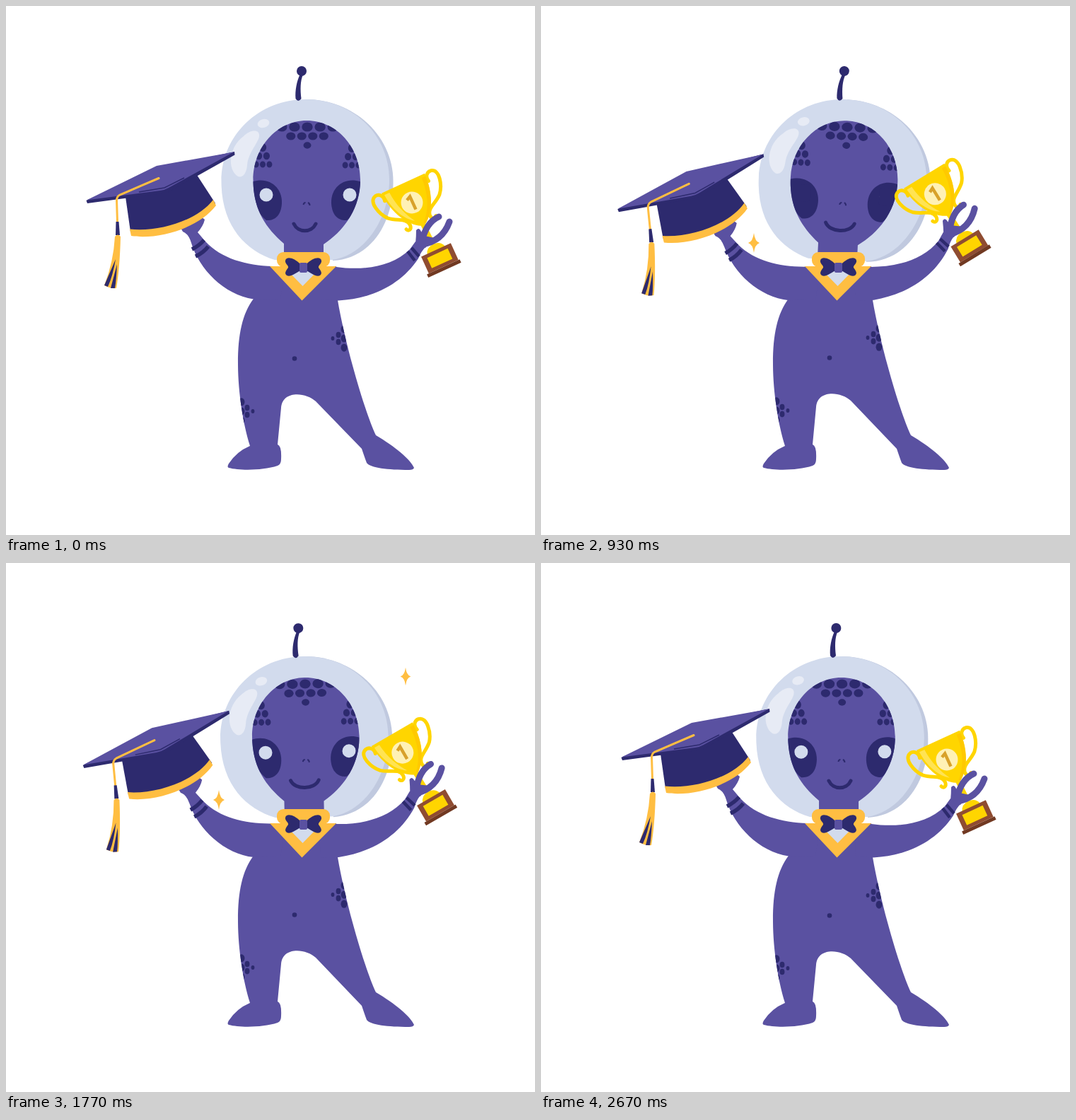
These frames come from a looping animation (748x748 px, 2700 ms). An HTML page:

```html
<!DOCTYPE html>
<html lang="en">
<head>
<meta charset="utf-8">
<title>Graduating alien</title>
<style>
  html, body { margin: 0; width: 100%; height: 100%; overflow: hidden; background: #fff; }
  svg { display: block; width: 100vw; height: 100vh; }
  .skin { fill: #5a51a1; }
  .navy { fill: #2d2a6e; }
  .gold { fill: #ffbe42; }
  .glass { fill: #d2dbed; }
  .shine { fill: #e7ebf5; }
  .cup { fill: #ffd500; }
  .line { fill: none; stroke: #2d2a6e; }
  .cord { fill: none; stroke: #ffbe42; stroke-width: 3; stroke-linecap: round; }
  .finger { fill: none; stroke: #5a51a1; stroke-width: 9; stroke-linecap: round; }
  .handle { fill: none; stroke: #ffd500; stroke-width: 5; stroke-linecap: round; }
</style>
</head>
<body>
<svg viewBox="0 0 748 748">
  <defs>
    <path id="faceShape" d="M425 162C468 162 501 200 501 246C501 286 478 318 449 337V352H393V336C365 312 349.500 285 349.500 246C349.500 200 383 162 425 162Z"/>
    <clipPath id="faceClip"><use href="#faceShape"/></clipPath>
    <clipPath id="bodyClip"><path id="bodyClipShape"/></clipPath>
    <path id="eye" class="navy" d="M347 249C371 240 391 256 390 279C389 298 378 304 368 303C355 293 347 275 347 249Z"/>
    <path id="wing" class="navy" d="M417 366C407 355 396 354 395 360C394 364 400 367 399 370C396 374 393 378 397 381C403 384 411 376 417 374Z"/>
    <path id="grip" class="handle" d="M34 -18C32 -25 37 -31 43 -30C56 -27 49 -4 40 6C29 16 16 16 15.500 28C16 35 22 35 23 31"/>
    <path id="star" class="gold" d="M0 -14Q1.500 -2 8 0Q1.500 2 0 14Q-1.500 2 -8 0Q-1.500 -2 0 -14Z"/>
  </defs>

  <path id="body" class="skin"/>
  <g id="bodyMarks">
    <circle class="navy" cx="408" cy="498.500" r="3.300"/>
    <g id="bodySpots" class="navy" clip-path="url(#bodyClip)"></g>
  </g>

  <g id="head">
    <path d="M424 132C492 132 547.500 184 547.500 248C547.500 312 512 358 462 360Z" fill="#c0c9df"/>
    <path class="glass" d="M424 132C490 132 542 182 542 246C542 300 508 352 462 359L380 359C338 346 304.500 310 304.500 248C304.500 182 358 132 424 132Z"/>
    <path class="shine" d="M336 184C345 175 357 174 358 182C359 192 343 205 341 225C340 238 334 243 328 241C313 232 314 200 336 184Z"/>
    <ellipse class="shine" cx="364" cy="166" rx="8.500" ry="6" transform="rotate(-15 364 166)"/>
    <circle class="navy" cx="418" cy="92" r="7"/>
    <path class="navy" d="M416 96C411 106 408.500 120 409.500 131Q413 137 417.500 131C416 118 416 106 420 97Z"/>
    <use href="#faceShape" class="skin"/>
    <g clip-path="url(#faceClip)">
      <g id="faceSpots" class="navy"></g>
      <use href="#eye"/>
      <use href="#eye" transform="matrix(-1 0 0 1 850 0)"/>
    </g>
    <g class="glass"><circle cx="368" cy="267" r="9.500"/><circle cx="486" cy="267" r="9.500"/></g>
    <path id="lids" class="navy"/>
    <path class="line" d="M420.500 281Q421 278 423.500 278M427 278Q429.500 279 429.500 282" stroke-width="2"/>
    <path id="mouth" class="line" stroke-width="5" stroke-linecap="round"/>
  </g>

  <g id="leftArm">
    <path class="skin" d="M395 372L377 368C340 367 304 357 282 333L271 320Q279 311 281 302L276 298L246 312L250 319Q258 322 262 335C273 372 308 408 350 414.500L388 415Z"/>
    <path class="line" stroke-width="5.500" d="M263 344Q273 339 280 331M268 354Q279 349 286 340"/>
    <path class="navy" d="M169 270L176 319C215 323 270 306 296 279L270 239Z"/>
    <path class="gold" d="M175 315.500C215 320 270 304 293 274L297 282C273 314 215 331 177 325Z"/>
    <path class="navy" d="M113.500 275L213 230L323 206L323.500 210.500L232 262Q226 265 220 265L115 279Z"/>
    <path class="skin" d="M114 274.500L213 226L322 206.500L230 257Q225 260 218 261Z"/>
    <path class="line" stroke-width="1.500" d="M188 263L224 257L252 243"/>
    <path class="cord" d="M216 243.500L161 267Q157 269 156.500 274"/>
    <g id="tassel">
      <path class="cord" stroke-width="2.500" d="M156.500 274L157.500 306"/>
      <path class="navy" d="M155.500 305H159.500L161 324H155Z"/>
      <path class="gold" d="M154 326Q158 321 162 326Q161 370 156 399Q147 400 139 395Q152 362 154 326Z"/>
      <path class="navy" d="M155 358Q151 382 144 397L139 395ZM157 365Q156 388 154 399L148 399Z"/>
    </g>
  </g>

  <g id="rightArm">
    <path class="skin" d="M445 372L467 369C503 374 545 370 571 344L579 333L593 341Q587 347 583 357C560 392 520 414 470 416.500L445 415Z"/>
    <path class="line" stroke-width="4.500" d="M568 347L578 360M573.500 342L584 354"/>
    <g transform="translate(574 278) rotate(-24.600)">
      <use href="#grip"/>
      <use href="#grip" transform="scale(-1 1)"/>
      <path class="cup" d="M-33.500 -30H33.500C33 2 20 25 5 35L6 66H-1L-2 35C-18 27 -33 2 -33.500 -30Z"/>
      <path d="M-31 -26H-23C-22 -6 -15 12 -7 25C-20 17 -30 -4 -31 -26Z" fill="#ffe353"/>
      <path d="M33 -26C32 2 20 25 5 35L3 33C17 20 26 0 27 -26Z" fill="#ffc900"/>
      <circle r="15.500" fill="#fff1b5"/>
      <path d="M-5 -6L1 -9V11" fill="none" stroke="#d8a12a" stroke-width="4.500"/>
      <path class="cup" d="M-11 76Q-8 66 3 66Q14 66 17 76Z"/>
      <path d="M-20 75H26V101H-20Z" fill="#8f4c31"/>
      <path d="M-23 101H28V106H-23Z" fill="#713922"/>
      <path class="cup" d="M-13 80H19V96H-13Z"/>
    </g>
    <path class="skin" d="M579 336Q580 326 580 317Q584 312 587 319L592 325L606 328L593 342Z"/>
    <path class="finger" d="M588 333Q594 306 612 298M588 337Q617 333 627 305"/>
  </g>

  <rect class="gold" x="383" y="348" width="75" height="21" rx="9"/>
  <path class="gold" d="M373 368H467L418.500 416.500Z"/>
  <path class="glass" d="M398 374H441L419.500 396Z"/>
  <use href="#wing"/>
  <use href="#wing" transform="matrix(-1 0 0 1 841 0)"/>
  <rect class="skin" x="415" y="363" width="11" height="14" rx="2"/>

  <g id="stars"></g>
</svg>
<script>
const LOOP = 2700;
const TWINKLE = 900;
const el = id => document.getElementById(id);
const set = (id, attr, value) => el(id).setAttribute(attr, value);
const smooth = (from, to, t) => {
  const u = Math.min(1, Math.max(0, (t - from) / (to - from)));
  return u * u * (3 - 2 * u);
};
const pulse = (t, a, b, c, d) => smooth(a, b, t) - smooth(c, d, t);

// Rows of ellipses fanning out from a tip; spot size changes row by row
function addPatch(id, { x, y, turn = 0, rows = [1, 2, 3], size, grow, step, aspect }) {
  let spots = "";
  rows.forEach((count, row) => {
    const rx = size + grow * row;
    for (let i = 0; i < count; i++) {
      const cx = (i - (count - 1) / 2) * rx * 2.35;
      spots += `<ellipse cx="${cx}" cy="${row * step}" rx="${rx}" ry="${rx * aspect}"/>`;
    }
  });
  el(id).innerHTML += `<g transform="translate(${x} ${y}) rotate(${turn})">${spots}</g>`;
}
const temple = { size: 5.2, grow: -0.6, step: 12, aspect: 1.15 };
const flank = { size: 3, grow: 1.3, step: 8, aspect: 0.8 };
addPatch("faceSpots", { x: 426, y: 197, turn: 180, rows: [1, 4, 5], size: 5.5, grow: 1.1, step: 13, aspect: 0.85 });
addPatch("faceSpots", { x: 363, y: 200, ...temple });
addPatch("faceSpots", { x: 489, y: 201, ...temple });
addPatch("bodySpots", { x: 462, y: 470, turn: -90, ...flank });
addPatch("bodySpots", { x: 349, y: 573, turn: 90, ...flank });

const stars = [
  { x: 248, y: 195, delay: 280 },
  { x: 565, y: 160.5, delay: 360 },
  { x: 301, y: 335, delay: 590 }
];
el("stars").innerHTML = stars.map(() => '<use href="#star"/>').join("");

const bodyPath = lift => `M377 368H467L469 416C479 475 505 568 523 607
  C550 623 572 641 577 653Q576 656 570 656C540 656 515 653 510 646Q507 638 503 626
  L438 ${559 - lift}C424 ${546 - lift} 391 ${543 - lift} 389 ${568 - lift}L384 620
  Q390 622 389 641Q389 648 384 650C363 657 330 657 315 653Q312 652 315 647Q326 630 345 622
  C335 590 328 545 328 505C328 465 334 435 350 414Z`;

function draw(now) {
  const t = now % LOOP;
  const left = pulse(t, 120, 1170, 1430, 2570);
  const right = pulse(t, 120, 1110, 1290, 2700);
  const sway = 2.45 * (Math.sin(2 * Math.PI * (t - 90) / LOOP) + 0.208);
  const lift = 0.7 * (1 - Math.cos(4 * Math.PI * t / LOOP));
  const shut = pulse(t, 420, 690, 1020, 1260);

  set("leftArm", "transform", `rotate(${-2.9 * left} 390 400)`);
  set("tassel", "transform", `rotate(${-1.7 * left} 157 274)`);
  set("rightArm", "transform", `rotate(${-7.5 * right} 464 411)`);
  set("head", "transform", `rotate(${sway} 424 315)`);

  const d = bodyPath(lift);
  set("body", "d", d);
  set("bodyClipShape", "d", d);
  set("bodyMarks", "transform", `translate(0 ${-lift})`);

  const lid = 256 + 22 * shut;
  set("lids", "d", [368, 486].map(x => `M${x - 10} 255h20V${lid}q-10 2 -20 0Z`).join(""));

  const wide = 5.5 * left, y = 308 - left;
  set("mouth", "d", `M${407 - wide} ${y}C${413 - wide} 321 ${432 + wide} 321 ${438 + wide} ${y}`);

  stars.forEach(({ x, y, delay }, i) => {
    const phase = Math.max(0, t - delay) % TWINKLE;
    const size = pulse(phase, 0, 60, 500, 560) * (1 - smooth(2540, 2640, t));
    el("stars").children[i].setAttribute("transform", `translate(${x} ${y}) scale(${size})`);
  });
}

const start = performance.now();
function tick() {
  draw(performance.now() - start);
  requestAnimationFrame(tick);
}
tick();
</script>
</body>
</html>
```
